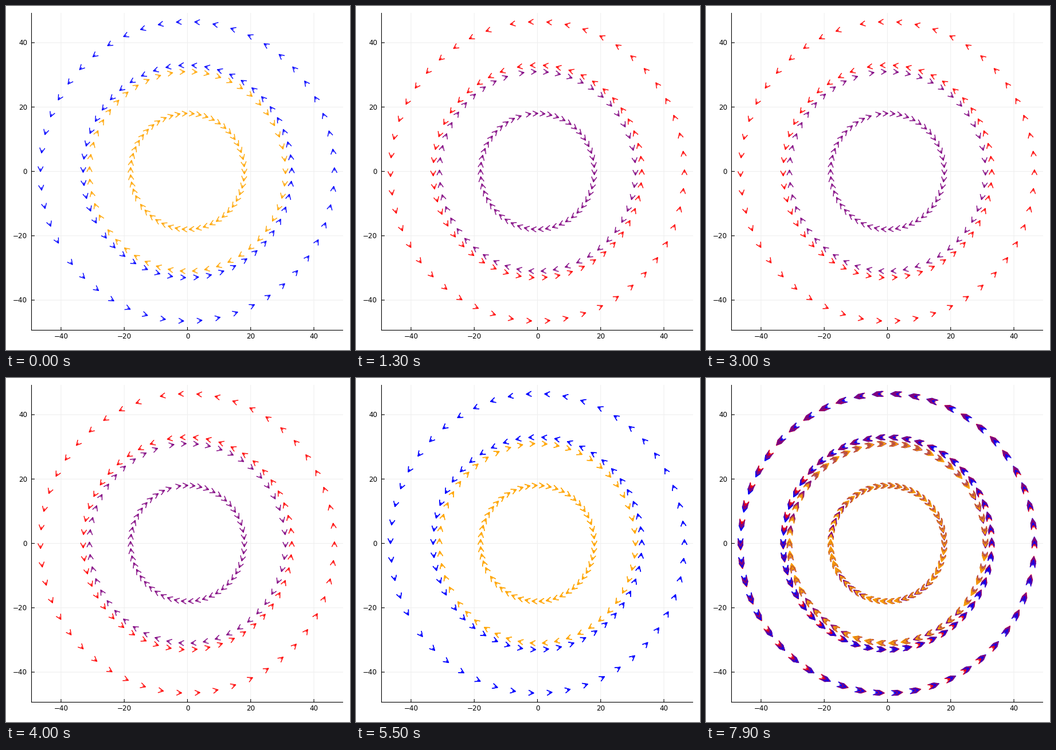
Write a matplotlib script that moves like this. It is 600 by 600 pixels and loops after 8 s.

```python
import numpy as np
import matplotlib.pyplot as plt
from matplotlib.animation import FuncAnimation
from matplotlib.collections import LineCollection

FRAMES, INTERVAL = 80, 100
HALF = 27                       # frames per sweep, before turning back
COUNT, STEP, START = 50, 7.146, 217.4
TURN = -36                      # degrees per pose
CX, CY, SX, SY = 316.5, 288.5, 5.513, 5.613
LEFT, RIGHT, TOP, BOTTOM = 44.5, 588, 12, 565.5
PX = 0.72                       # points per pixel at 100 dpi

INNER = dict(radii=(31, 18), spin=-1, colors=("orange", "purple"))
OUTER = dict(radii=(46.5, 33), spin=1, colors=("blue", "red"))

plt.rcParams["font.family"] = "DejaVu Sans"
fig = plt.figure(figsize=(6, 6), dpi=100, facecolor="white")
ax = fig.add_axes([0, 0, 1, 1])
ax.set_xlim(0, 600)
ax.set_ylim(600, 0)
ax.axis("off")


def line(xs, ys, color="black", width=1.1, z=1):
    ax.plot(xs, ys, color=color, lw=width * PX, zorder=z,
            solid_capstyle="butt", snap=False)


def draw_axes():
    for v in range(-40, 41, 20):
        x, y = CX + SX * v, CY - SY * v
        line([x, x], [TOP, BOTTOM], "#efefef", z=0)
        line([LEFT, RIGHT], [y, y], "#efefef", z=0)
        line([x, x], [BOTTOM, BOTTOM - 5.5])
        line([LEFT, LEFT + 5.5], [y, y])
        label = str(v).replace("-", "\u2212")
        ax.text(x, 580.5, label, size=12 * PX, ha="center", va="baseline")
        ax.text(37, y + 4.4, label, size=12 * PX, ha="right", va="baseline")
    line([LEFT, LEFT], [TOP, BOTTOM + 0.5])
    line([LEFT - 0.5, RIGHT], [BOTTOM, BOTTOM])


def arrow(angle, radius, spin, size=10, spread=np.radians(27), shaft=5.5):
    """Open arrow centred on the ring, pointing along it."""
    c, s = np.cos(angle), np.sin(angle)
    mid = np.array([CX + SX * radius * c, CY - SY * radius * s])
    way = spin * np.array([-s, -c])
    heading = np.arctan2(way[1], way[0])
    tip = mid + way * size / 2
    wings = [tip - size * np.array([np.cos(heading + a), np.sin(heading + a)])
             for a in (spread, -spread)]
    return [[wings[0], tip, wings[1]], [tip - way * shaft, tip]]


def layer(group, pose):
    angles = np.radians(START + TURN * pose + STEP * np.arange(COUNT))
    lines = [seg for r in group["radii"] for a in angles
             for seg in arrow(a, r, group["spin"])]
    return lines, [group["colors"][pose % 2]] * len(lines)


def layers_at(frame):
    """Sweep there and back, then pile up the poses ring pair by ring pair."""
    if frame < 2 * HALF:
        pose = min(frame, 2 * HALF - 1 - frame)
        return [(INNER, pose), (OUTER, pose)]
    shown = frame - 2 * HALF + 1
    piled = [((INNER, OUTER)[i % 2], i // 2) for i in range(shown)]
    return [(INNER, 0), (OUTER, 0)] + piled


draw_axes()
arrows = LineCollection([], linewidths=1.4 * PX, zorder=3,
                        capstyle="butt", joinstyle="round", snap=False)
ax.add_collection(arrows, autolim=False)


def update(frame):
    lines, colors = [], []
    for group, pose in layers_at(frame):
        segs, tint = layer(group, pose)
        lines += segs
        colors += tint
    arrows.set_segments(lines)
    arrows.set_color(colors)
    return [arrows]


anim = FuncAnimation(fig, update, frames=FRAMES, interval=INTERVAL,
                     init_func=lambda: update(0), repeat=True,
                     repeat_delay=0, blit=False)
plt.show()
```
